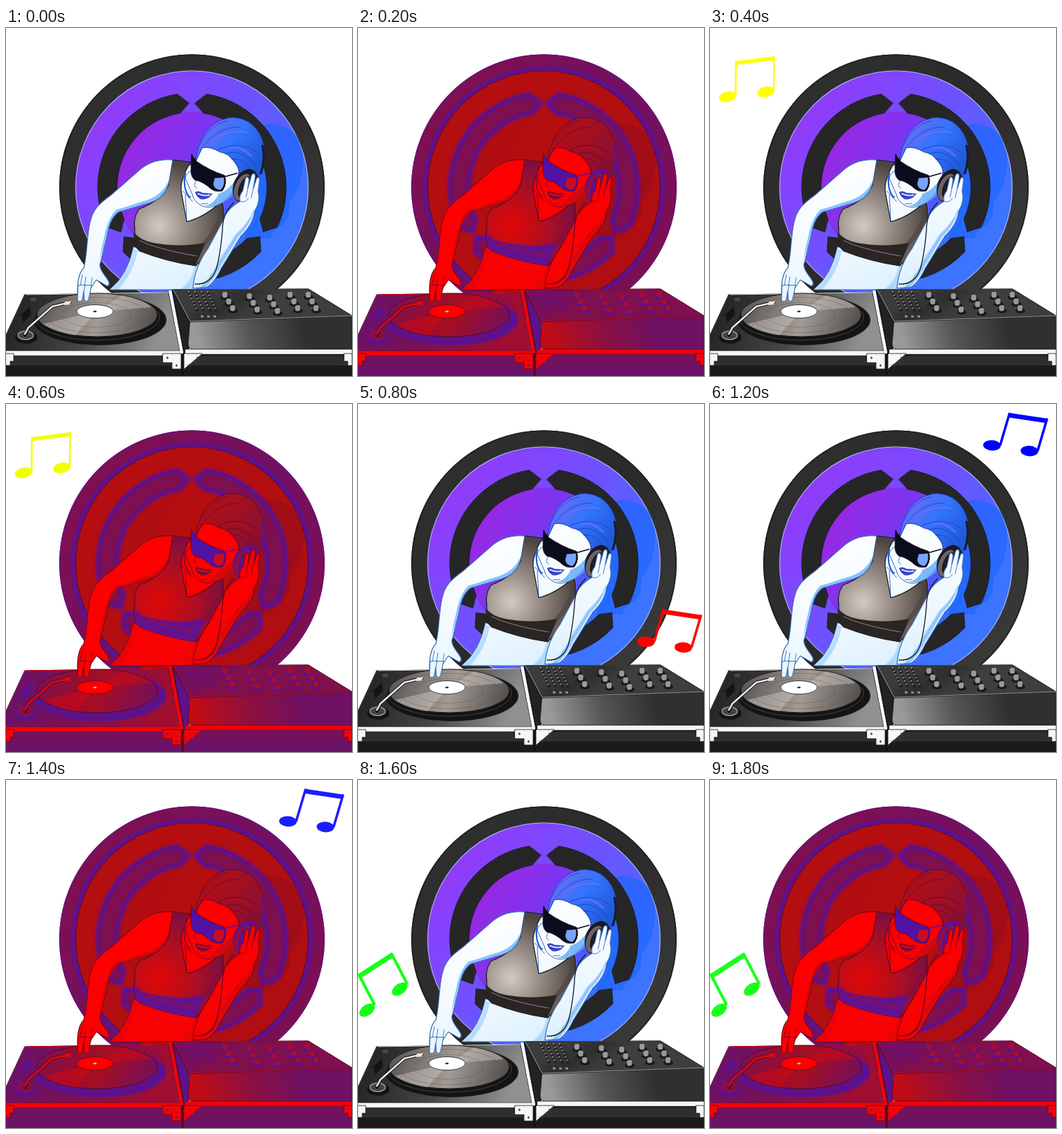
Write an HTML page that moves like this. It is 494x496 px and loops after 2000 ms.

```html
<!DOCTYPE html>
<html lang="en">
<head>
<meta charset="utf-8">
<title>DJ</title>
<style>
html, body { margin: 0; width: 100%; height: 100%; overflow: hidden; background: #fff; }
svg { display: block; width: 494px; height: 496px; }
</style>
</head>
<body>
<svg id="stage" viewBox="0 0 494 496" xmlns="http://www.w3.org/2000/svg"></svg>
<script>
const STEP = 200, STEPS = 10, CX = 265.5, CY = 227;

const cool = {
  id: 'cool', line: '#15161c', ring: ['#303030', '#2a2a2a', '#3c3c3c'], rim: '#222', seam: '#a9b4ff',
  disc: ['#8f3cfa', '#6d52ff', '#3d74ff'], core: ['#9928e2', '#7438f4', '#3572ff'],
  arc: '#262626', glow: 'none', shade: '#1766ff', hair: ['#6f6cf8', '#2f74fc', '#2058dc'], strand: '#1c3fb4',
  skin: ['#ffffff', '#f3faff', '#d6edff'], skinLine: '#3a6cb8', tone: '#5aaaff',
  top: ['#d2cac4', '#91867f', '#4c4440'], hem: '#2a2524', lens: '#0b0d1c', shine: '#7aa4ff', lip: '#3b45c8',
  phone: '#1d1a20', pad: '#6d6468', deck: ['#262626', '#444', '#909090'], well: '#141414',
  vinyl: ['#5a5552', '#a19a95', '#4b4744'], groove: '#55504d', label: '#fff', hole: '#333',
  metal: '#e8e8e8', mixTop: ['#3c3c3c', '#2e2e2e', '#3e3e3e'], mixFront: ['#9a9a9a', '#555', '#303030'],
  side: '#222', knob: '#9a9a9a', knobDark: '#191919', trim: '#f6f6f6', box: '#1b1b1b', edge: '#444'
};

const hot = {
  id: 'hot', line: '#5c0a24', ring: ['#82104c', '#721064', '#800f4c'], rim: '#6a1274', seam: '#5c0c3c',
  disc: ['#b50e10', '#b30f10', '#b00e12'], core: ['#ad0e12', '#b80d0e', '#ac0f14'],
  arc: '#7e1050', glow: '#4a12b4', shade: '#980d1c', hair: ['#b40f18', '#a01022', '#880f34'], strand: '#5e0c2c',
  skin: ['#ff0000', '#fc0000', '#f40404'], skinLine: '#780a1c', tone: '#c80a0e',
  top: ['#e00808', '#b40e1c', '#800f40'], hem: '#64128c', lens: '#5212a4', shine: '#c80c20', lip: '#780c30',
  phone: '#5c1290', pad: '#8e1040', deck: ['#6c1268', '#7c1054', '#a00e30'], well: '#5a1290',
  vinyl: ['#7c104c', '#a80e20', '#701060'], groove: '#6c1068', label: '#ff0000', hole: '#ffb0a0',
  metal: '#e8060c', mixTop: ['#721060', '#80104c', '#80104c'], mixFront: ['#c00c14', '#8c1040', '#701062'],
  side: '#5c1288', knob: '#a80e28', knobDark: '#5a1290', trim: '#f00408', box: '#6c1268', edge: '#7c1050'
};

const path = (d, fill, stroke = 'none', w = 1, more = '') =>
  `<path d="${d}" fill="${fill}" stroke="${stroke}" stroke-width="${w}" stroke-linejoin="round" stroke-linecap="round" ${more}/>`;
const line = (d, stroke, w = 1, more = '') => path(d, 'none', stroke, w, more);
const oval = (x, y, rx, ry, fill, more = '') =>
  `<ellipse cx="${x}" cy="${y}" rx="${rx}" ry="${ry}" fill="${fill}" ${more}/>`;
const turn = (a, x, y) => `transform="rotate(${a} ${x} ${y})"`;
const veil = (d, fill, opacity) => path(d, fill, 'none', 0, `opacity="${opacity}"`);

function polar(r, deg) {
  const a = deg * Math.PI / 180;
  return `${(CX + r * Math.cos(a)).toFixed(1)},${(CY + r * Math.sin(a)).toFixed(1)}`;
}

// Part of the inner band, pointed at both ends.
const band = ([from, to]) =>
  `M${polar(120, from + 2)}L${polar(134.5, from + 9)}A134.5 134.5 0 0 1 ${polar(134.5, to - 9)}` +
  `L${polar(120, to - 2)}L${polar(107, to - 9)}A107 107 0 0 0 ${polar(107, from + 9)}Z`;

// Four numbers make a linear gradient, three a radial one.
function gradients(p) {
  const boxes = {
    ring: [90, 90, 430, 380], disc: [170, 90, 395, 270], core: [185, 140, 372, 250],
    hair: [285, 135, 360, 195], skin: [140, 190, 215, 420], top: [218, 282, 92],
    deck: [25, 385, 205, 470], vinyl: [50, 385, 215, 440], mixTop: [300, 372, 330, 420],
    mixFront: [275, 450, 420, 412]
  };
  return Object.entries(boxes).map(([name, [a, b, c, d]]) => {
    const kind = d === undefined ? 'radial' : 'linear';
    const place = d === undefined ? `cx="${a}" cy="${b}" r="${c}"` : `x1="${a}" y1="${b}" x2="${c}" y2="${d}"`;
    const stops = p[name].map((color, i) => `<stop offset="${i / 2}" stop-color="${color}"/>`).join('');
    return `<${kind}Gradient id="${p.id}-${name}" gradientUnits="userSpaceOnUse" ${place}>${stops}</${kind}Gradient>`;
  }).join('');
}

function backdrop(p, g) {
  const soft = 'filter="url(#soft)"';
  const bands = [[270, 394], [34, 146], [146, 270]].map(band).join('');
  const round = (r, fill, more = '') => oval(CX, CY, r, r, fill, more);
  return round(189.5, g('ring')) +
    round(188.5, 'none', `stroke="${p.rim}" stroke-width="2"`) +
    round(169, 'none', `stroke="${p.glow}" stroke-width="4" ${soft}`) +
    round(166, g('disc'), `stroke="${p.seam}" stroke-width="1.2"`) +
    round(108, g('core')) +
    veil('M352 150C366 132 385 136 396 141C408 145 418 153 419 164Q428 186 421 213C420 230 408 240 405 250Q406 268 396 280Q384 285 377 300L340 300Z', p.shade, .6) +
    path(bands, p.arc, p.line, .8) +
    line(bands, p.glow, 4.5, soft);
}

function body(p, g) {
  const skin = g('skin'), ink = p.skinLine;
  return path('M182 312L250 331L276 334L272 373L148 373Q174 352 182 312Z', skin, ink) +
    veil('M150 373Q176 349 183 314L188 318Q182 350 160 373ZM270 338L274 338L272 373L248 373Q266 360 270 338Z', p.tone, .35) +
    // torso, neck and top
    path('M258 192L276 205L312 240L308 258L257 278L247 231Z', skin, ink) +
    path('M238 188L264 191Q249 214 250 232L258 276Q283 270 308 247Q314 268 304 290Q296 314 271 339Q229 333 191 318Q180 309 184 288Q181 270 190 258Q222 246 232 224Z', g('top'), p.line, 1.2) +
    path('M184 291Q188 302 215 307Q250 313 285 306L270 339Q228 333 191 318Q181 309 184 291Z', p.hem) +
    line('M191 303Q215 315 272 325', p.top[1], 1) +
    veil('M308 250Q303 282 280 306L284 310Q308 288 309 262Z', p.top[2], .6) +
    line('M252 232L266 247M254 208Q253 228 262 242M258 272L256 238', ink, 1) +
    // reaching arm and hand
    path('M238 188C218 186 203 192 191 202L150 238C132 251 123 259 119 282C115 304 116 324 111 342C103 350 102 363 102 375L103 389Q106 392 109 387L111 375L112 389Q116 392 118 386L121 371L129 359L143 367Q148 369 147 362C143 354 134 346 134 338L143 302C147 282 149 269 161 262L205 249C222 244 230 232 233 218Z', skin, ink, 1.2) +
    veil('M233 216Q224 237 202 245L158 259Q147 268 141 294L133 331L140 312Q146 274 161 262L205 249Q227 242 233 216Z', p.tone, .7) +
    line('M111 375L114 355M121 371L123 356M106 368L109 352', ink, .9);
}

function head(p, g) {
  const skin = g('skin'), ink = p.skinLine;
  return path('M281 170C298 163 322 180 333 202L329 224C317 246 298 260 281 254Q268 248 266 237L256 214Q258 203 268 204L271 189Z', skin, ink) +
    veil('M329 214Q318 232 304 236Q298 250 284 254Q308 256 328 234Z', p.tone, .8) +
    path('M271 190C273 162 287 133 319 128C347 125 369 148 369 179C368 194 364 208 356 219L333 219C336 194 320 179 306 177Q291 168 280 171Z', g('hair'), p.strand, 1) +
    line('M283 168Q300 142 333 141M302 174Q332 159 358 177M312 179Q336 171 357 197M322 187Q342 184 350 208M277 166Q290 138 316 132', p.strand, .8) +
    line('M292 163Q316 143 345 149M318 171Q337 168 350 182', p.hair[0], 2) +
    path('M265 180L272 190Q290 203 312 210Q316 222 309 232Q297 235 289 226Q277 217 270 217Q264 212 264 204Z', p.lens, p.line, 1) +
    path('M298 214L311 213Q313 225 306 231Q297 230 296 222Z', p.shine) +
    line('M312 212L330 207', p.lens, 1.5) +
    path('M270 234Q274 231 281 235L295 236Q288 246 278 244Q272 241 270 234Z', p.lip) +
    line('M274 236Q282 240 291 238', p.label, 1.5) +
    line('M272 218Q266 225 272 228M279 250Q283 252 288 250', ink, .9) +
    line('M256 207Q253 222 257 233Q259 239 263 241', p.hair[2], 2) +
    // headphones
    line('M366 168Q371 184 364 207', p.phone, 3) +
    oval(342, 225, 17, 25, p.phone, turn(23, 342, 225)) +
    oval(338, 227, 11, 20, p.pad, turn(23, 338, 227)) +
    oval(341, 227, 8, 17, p.phone, turn(23, 341, 227)) +
    // raised arm and fingers
    path('M334 247Q332 240 338 232L342 214Q346 210 347 216L345 229L351 209Q355 205 356 211L353 229L358 214Q362 211 362 217L360 233Q364 246 355 261Q353 280 335 297L307 343Q297 364 287 369L267 371Q269 341 288 315L309 276Q313 260 334 247Z', skin, ink, 1.2) +
    veil('M355 257Q350 280 332 297L305 342Q295 362 283 370L277 370Q295 352 304 332L328 294Q346 278 355 257Z', p.tone, .6) +
    line('M345 229L343 241M353 229L350 242M334 247Q341 250 346 243', ink, .9) +
    line('M325 249Q309 264 309 288Q306 324 300 344Q292 366 270 365', p.line, 1.3);
}

function turntable(p, g) {
  const rings = [72, 50].map(r =>
    oval(129, 409, r, r * .35, 'none', `stroke="${p.groove}" stroke-width=".6" opacity=".6"`)).join('');
  return path('M27 380L232 377L249 464L0 464L0 438Z', g('deck'), p.line, 1) +
    line('M29 380L231 377', p.metal, 1) +
    oval(134, 416, 95, 36, p.well) +
    oval(130, 412, 89, 33, p.well, `stroke="${p.edge}" stroke-width="1"`) +
    oval(130, 409, 86, 31, g('vinyl'), `stroke="${p.line}" stroke-width="1"`) +
    veil('M130 404L52 422Q72 434 99 438ZM130 404L208 398Q194 386 165 381Z', p.top[0], .45) +
    rings +
    oval(127, 404, 26, 9.5, p.label, `stroke="${p.line}" stroke-width=".8"`) +
    oval(127, 404, 2.5, 1.3, p.hole) +
    // tone arm
    path('M22 408L34 397L36 408L25 420Z', p.well) +
    oval(39, 387, 5, 3, p.edge) +
    oval(29, 441, 16, 9, p.well) +
    oval(28, 438, 11, 6, p.edge, `stroke="${p.knob}" stroke-width="1.5"`) +
    line('M27 438L32 427L66 397L91 391', p.line, 4.5) +
    line('M27 436L32 427L66 397L91 391', p.metal, 2.5) +
    path('M84 390L93 389L91 394L83 395Z', p.metal) +
    // playing hand stays above the record
    path('M103 367L102 387Q105 393 109 387L111 375L112 388Q116 392 118 386L122 367Z', g('skin'), p.skinLine) +
    line('M111 376L113 366', p.skinLine, .9);
}

function mixer(p, g) {
  let knobs = '';
  for (const [x, y] of [[312, 380], [347, 382], [376, 384], [405, 380], [431, 380]])
    for (let i = 0; i < 3; i++) {
      const kx = x + i * 5.5, ky = y + i * 9.5;
      knobs += oval(kx + 1, ky + 4, 7, 3.5, p.knobDark) +
        path(`M${kx - 3} ${ky - 2}v5q3.5 3 7 0v-5z`, p.knob) + oval(kx + .5, ky - 2, 3.5, 2, p.knob);
    }
  let faders = '';
  for (let i = 0; i < 4; i++) {
    const x = 261 + i * 9;
    faders += line(`M${x} 376L${x + 12} 403`, p.knobDark, 2.5) +
      line(`M${x} 376L${x + 12} 403`, p.knob, 2.2, 'stroke-dasharray=".1 5"');
    if (i) faders += oval(x + 10, 411, 2.2, 1.6, p.knob);
  }
  return path('M237 374L262 419L261 458L251 462Z', p.side, p.line) +
    path('M238 373L432 372L494 410V416L262 419Z', g('mixTop'), p.line) +
    path('M263 419L494 410V458H266Q260 457 260 450Z', g('mixFront'), p.line, .8) +
    line('M239 373L263 418L494 410', p.knob, .9) + line('M239 373L431 372', p.edge, 1) +
    knobs + faders;
}

function cases(p) {
  const latch = (x, w) => path(`M${x} 464h${w}v22h-${w / 2}v-9h-${w / 2}z`, p.trim, p.line, .8,
    w < 0 ? '' : '') + oval(x + w * .25, 470, 1.5, 1.5, p.edge) + oval(x + w * .75, 481, 1.5, 1.5, p.edge);
  return path('M0 461H494V496H0Z', p.box) +
    path('M0 467H494V481H0Z', p.edge, 'none', 0, 'opacity=".5"') +
    path('M0 460H249V467H0ZM256 458H494V465H256Z', p.trim, p.line, .5) +
    latch(224, 26) + latch(280, -26) +
    path('M0 464H11V475H6V481H0Z', p.trim, p.line, .8) +
    path('M483 464H494V481H488V475H483Z', p.trim, p.line, .8) +
    path('M250 462H254V496H250Z', p.line) +
    line('M234.5 376L251 462', p.trim, 4.5) + line('M238 375L254 462', p.line, 1.5);
}

function scene(p) {
  const g = name => `url(#${p.id}-${name})`;
  return `<g id="${p.id}"><defs>${gradients(p)}</defs>` +
    [backdrop, body, head, turntable, mixer, cases].map(part => part(p, g)).join('') + '</g>';
}

// Two joined eighth notes: first head, gap to the second, stem base and stem vector.
function note(x, y, [dx, dy], [bx, by], [sx, sy], tilt, w) {
  const x1 = x + bx, y1 = y + by;
  const stem = `M${x1} ${y1}l${sx} ${sy}`, beam = `M${x1 + sx} ${y1 + sy + 2}l${dx} ${dy}`;
  const ball = (cx, cy) => oval(cx, cy, 12.5, 7.5, 'currentColor', turn(tilt, cx, cy));
  return '<g class="note">' + line(`${stem}M${x1 + dx} ${y1 + dy}l${sx} ${sy}`, 'currentColor', w) +
    line(beam, 'currentColor', w + 3, 'style="stroke-linecap:butt"') + ball(x, y) + ball(x + dx, y + dy) + '</g>';
}

const leaning = [[53.5, 8], [12, -1], [13, -44], 3, 3.5];
const stage = document.getElementById('stage');
stage.innerHTML =
  '<defs><filter id="soft"><feGaussianBlur stdDeviation="2"/></filter></defs>' +
  scene(cool) + scene(hot) +
  note(25, 98, [54.5, -7], [11.5, -1], [.5, -49], -12, 2.5) +
  note(411, 339, ...leaning) +
  note(402.5, 59, ...leaning) +
  note(13, 328, [46.5, -30], [10, -9], [-21.5, -41], -35, 4);

const looks = ['cool', 'hot'].map(id => document.getElementById(id));
const notes = [...stage.querySelectorAll('.note')];
const tints = [['#ffff00', '#f1ff00'], ['#ff0000', '#ff1c1c'], ['#0000ff', '#1c1cff'], ['#14ff14', '#1aff1a']];
const show = (el, on) => el.style.display = on ? '' : 'none';

function draw() {
  const step = Math.floor(performance.now() / STEP) % STEPS;
  const look = step % 2, current = (step >> 1) - 1;
  looks.forEach((el, i) => show(el, i === look));
  notes.forEach((el, i) => {
    show(el, i === current);
    el.style.color = tints[i][look];
  });
  requestAnimationFrame(draw);
}
draw();
</script>
</body>
</html>
```
